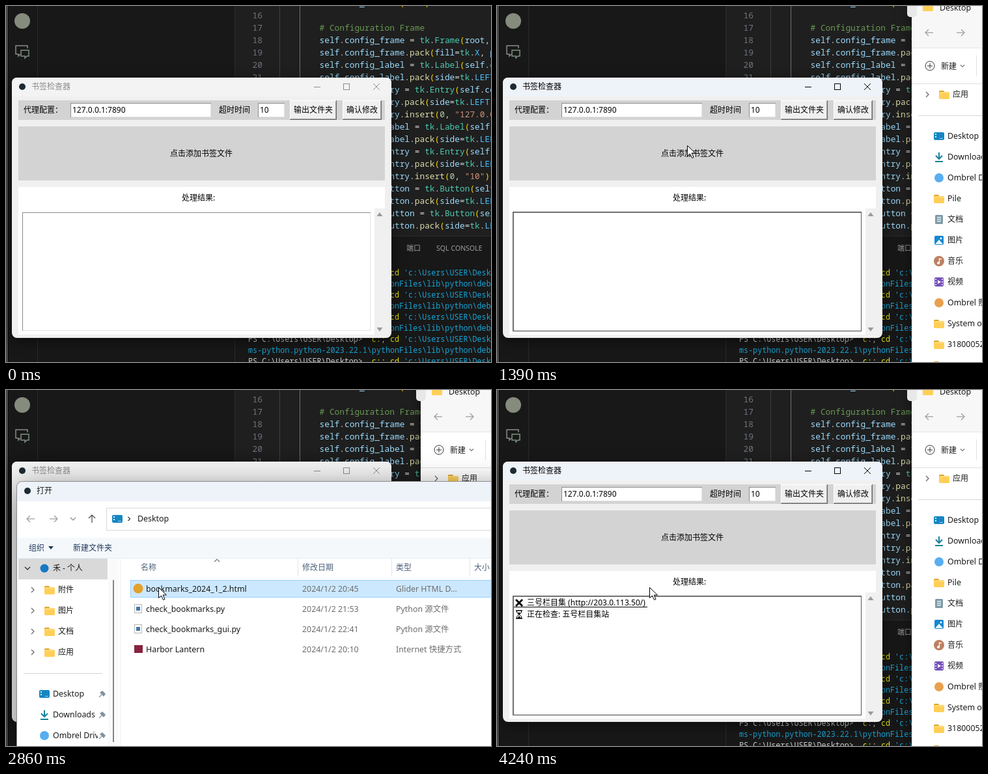
Recreate the animation shown at these times as an HTML page with a canvas. Size 745 px wide and 547 px high, loop 6100 ms.

```html
<!DOCTYPE html>
<html lang="zh">
<head>
<meta charset="utf-8">
<title>书签检查器</title>
<style>
html, body { margin: 0; width: 100%; height: 100%; overflow: hidden; background: #181818; }
canvas { display: block; width: 745px; height: 547px; }
</style>
</head>
<body>
<canvas id="stage" width="745" height="547"></canvas>
<script>
const W = 745, H = 547, LOOP = 6100;
const ctx = document.getElementById('stage').getContext('2d');
const SANS = '"Noto Sans", "Noto Sans CJK SC", sans-serif';
const MONO = '"Noto Sans Mono", "Noto Sans CJK SC", monospace';

// Pointer positions, each held until the next: [time, x, y]
const POINTER = [
  [70, 312, 428], [135, 305, 396], [200, 296, 352], [265, 286, 308], [330, 277, 274],
  [400, 270, 250], [460, 267, 238], [530, 266, 233], [1330, 278, 226], [1390, 292, 214],
  [2260, 285, 226], [2320, 265, 262], [2380, 252, 284], [2450, 240, 298],
  [2510, 236, 302], [2580, 234, 303]
];
const CLICKS = [[950, 1190], [2790, 2860], [2920, 3060]];
const within = (t, a, b) => t >= a && t < b;

function rect(x, y, w, h, color) {
  ctx.fillStyle = color;
  ctx.fillRect(x, y, w, h);
}

function frame(x, y, w, h, color) {
  ctx.strokeStyle = color;
  ctx.lineWidth = 1;
  ctx.strokeRect(x + .5, y + .5, w - 1, h - 1);
}

function rounded(x, y, w, h, r, color) {
  ctx.fillStyle = color;
  ctx.beginPath();
  ctx.roundRect(x, y, w, h, r);
  ctx.fill();
}

function circle(x, y, r, color) {
  ctx.fillStyle = color;
  ctx.beginPath();
  ctx.arc(x, y, r, 0, 7);
  ctx.fill();
}

function path(points, color, fill = false, width = 1) {
  ctx.beginPath();
  for (let i = 0; i < points.length; i += 2) ctx.lineTo(points[i], points[i + 1]);
  if (fill) {
    ctx.fillStyle = color;
    ctx.fill();
  } else {
    ctx.strokeStyle = color;
    ctx.lineWidth = width;
    ctx.stroke();
  }
}

// Text placed by its left edge and vertical centre, on a whole-pixel baseline
function text(str, x, cy, color = '#000', size = 12, family = SANS) {
  ctx.font = `${family === MONO ? 500 : 400} ${size}px ${family}`;
  ctx.fillStyle = color;
  ctx.fillText(str, x, Math.round(cy + size * .35));
  return ctx.measureText(str).width;
}

const label = (str, x, cy, color = '#1a1a1a') =>
  text(str, x, cy, color, /[a-z0-9]{2}/i.test(str) ? 12.4 : 12);

function shadowed(blur, alpha, dy, draw) {
  ctx.save();
  ctx.shadowColor = `rgba(0,0,0,${alpha})`;
  ctx.shadowBlur = blur;
  ctx.shadowOffsetY = dy;
  draw();
  ctx.restore();
}

function clipped(x, y, w, h, draw) {
  ctx.save();
  ctx.beginPath();
  ctx.rect(x, y, w, h);
  ctx.clip();
  draw();
  ctx.restore();
}

function chevron(x, y, dir, color = '#555', s = 3) {
  const shapes = {
    right: [x - s / 2, y - s, x + s / 2, y, x - s / 2, y + s],
    down: [x - s, y - s / 2, x, y + s / 2, x + s, y - s / 2],
    up: [x - s, y + s / 2, x, y - s / 2, x + s, y + s / 2]
  };
  path(shapes[dir], color, false, 1.2);
}

function arrow(x, y, dx, dy, color) {
  path([x - dx * 6, y - dy * 6, x + dx * 6, y + dy * 6], color, false, 1.2);
  const px = x + dx * 6, py = y + dy * 6;
  path([px - dx * 5 - dy * 5, py - dy * 5 - dx * 5, px, py,
        px - dx * 5 + dy * 5, py - dy * 5 + dx * 5], color, false, 1.2);
}

// Icons are centred on (x, y)
const icons = {
  folder(x, y) {
    rounded(x - 8, y - 6, 8, 6, 1.5, '#e0a92e');
    rounded(x - 8, y - 4, 16, 11, 1.5, '#ffcf57');
    rect(x - 7, y - 3, 14, 1, '#ffe29a');
  },
  desktop(x, y) {
    rounded(x - 8, y - 6, 16, 12, 2, '#1686c2');
    rect(x - 6, y - 4, 2, 2, '#d8f1ff');
    rect(x - 6, y, 2, 2, '#d8f1ff');
    rect(x + 1, y + 3, 5, 1, '#8dd2f5');
  },
  download(x, y) {
    path([x, y - 7, x, y + 3], '#12809a', false, 2);
    path([x - 5, y - 2, x, y + 3, x + 5, y - 2], '#12809a', false, 2);
    path([x - 6, y + 7, x + 6, y + 7], '#12809a', false, 2);
  },
  drive: (x, y) => circle(x, y, 7, '#57aef2'),
  cloud: (x, y) => circle(x, y, 6.5, '#1679c5'),
  photos: (x, y) => circle(x, y, 7, '#e8a04c'),
  browser: (x, y) => circle(x, y, 7.5, '#e3a02c'),
  game: (x, y) => rect(x - 6, y - 6, 13, 12, '#86233e'),
  script(x, y) {
    rect(x - 6, y - 7, 12, 14, '#fff');
    frame(x - 6, y - 7, 12, 14, '#b5b5b5');
    rect(x - 3, y - 3, 6, 6, '#4678a5');
  },
  document(x, y) {
    rounded(x - 6, y - 7, 12, 14, 1.5, '#7f9ba8');
    for (const dy of [-4, -1, 2]) rect(x - 3, y + dy, 6, 1.5, '#e8f2f6');
  },
  picture(x, y) {
    rounded(x - 7, y - 7, 14, 14, 2, '#1787cf');
    path([x - 6, y + 6, x, y - 1, x + 6, y + 6], '#e9f7ff', true);
    circle(x + 3, y - 3, 1.5, '#fff');
  },
  music(x, y) {
    circle(x, y, 8, '#bd8062');
    circle(x - 1, y + 3, 2, '#fff');
    path([x + .5, y + 3, x + .5, y - 4, x + 4, y - 3], '#fff', false, 1.3);
  },
  video(x, y) {
    rounded(x - 7, y - 7, 14, 14, 2, '#7651b8');
    for (const dy of [-5, -1, 3]) {
      rect(x - 6, y + dy, 2, 2, '#d8c8f2');
      rect(x + 4, y + dy, 2, 2, '#d8c8f2');
    }
    path([x - 2, y - 3, x + 3, y, x - 2, y + 3], '#fff', true);
  }
};

const FIRST_LINE = 15;
const CODE = [
  'self.use_default(root)',
  '',
  '# Configuration Frame',
  'self.config_frame = tk.Frame(root, bg="lightgray")',
  'self.config_frame.pack(fill=tk.X, padx=10)',
  'self.config_label = tk.Label(self.config_frame)',
  'self.config_label.pack(side=tk.LEFT, padx=5)',
  'self.proxy_entry = tk.Entry(self.config_frame)',
  'self.proxy_entry.pack(side=tk.LEFT, padx=5)',
  'self.proxy_entry.insert(0, "127.0.0.1:7890")',
  'self.timeout_label = tk.Label(self.config_frame)',
  'self.timeout_label.pack(side=tk.LEFT, padx=5)',
  'self.timeout_entry = tk.Entry(self.config_frame)',
  'self.timeout_entry.pack(side=tk.LEFT, padx=5)',
  'self.timeout_entry.insert(0, "10")',
  'self.output_button = tk.Button(self.config_frame)',
  'self.output_button.pack(side=tk.LEFT, padx=5)',
  'self.confirm_button = tk.Button(self.config_frame)',
  'self.confirm_button.pack(side=tk.LEFT, padx=5)'
];
const TOKENS = /#.*|"[^"]*"|\w+(?=\()|\w+|\s+|./g;

function tokenColor(token) {
  if (token[0] === '#') return '#6a9955';
  if (token[0] === '"') return '#ce9178';
  if (/^\d/.test(token)) return '#b5cea8';
  if (/^(tk|Frame|Label|Entry|Button)$/.test(token)) return '#4ec9b0';
  if (/^(pack|insert)$/.test(token)) return '#dcdcaa';
  if (/^[A-Z]+$/.test(token)) return '#4fc1ff';
  if (/^\w/.test(token)) return '#9cdcfe';
  return /[()]/.test(token) ? '#ffd700' : '#d4d4d4';
}

function drawTerminal() {
  rect(352, 353, W, H, '#181818');
  rect(352, 353, W, 1, '#2b2b2b');
  text('端口', 615, 372, '#9d9d9d', 11);
  text('SQL CONSOLE', 661, 372, '#9d9d9d', 10.6);
  const size = 11.72, cyan = '#18a5d6';
  for (let i = 0; i < 9; i++) {
    const y = 410 + 17 * i;
    if (i % 2) {
      text('ms-python.python-2023.22.1\\pythonFiles\\lib\\python\\debugpy', 372, y, cyan, size, MONO);
      continue;
    }
    let x = 372;
    for (const [part, color] of [
      ['PS C:\\Users\\USER\\Desktop>  ', '#cccccc'], ['c:', '#e5e510'], ['; ', '#cccccc'],
      ['cd ', '#e5e510'], ["'c:\\Users\\USER\\Desktop'", cyan]
    ]) x += text(part, x, y, color, size, MONO);
  }
}

function drawEditor() {
  rect(0, 0, W, H, '#181818');
  rect(352, 0, W, 353, '#1f1f1f');
  rect(1, 0, 1, H, '#8a8a8a');
  rect(48, 0, 1, H, '#2b2b2b');
  rect(351, 0, 1, H, '#2b2b2b');
  circle(25, 23, 12, '#858c7d');
  path([22, 74, 19, 77, 19, 74, 15, 74, 15, 61, 33, 61, 33, 65], '#8a8a8a', false, 1.5);
  path([23, 68, 35, 68, 35, 77, 32, 77, 29, 80, 29, 77, 23, 77, 23, 67.5], '#7d9180', false, 1.5);
  rect(420, 0, 1, 353, '#404040');
  rect(451, 0, 1, 353, '#707070');
  CODE.forEach((line, i) => {
    const y = 19 * i - 4;
    text(FIRST_LINE + i, 378.5, y, '#6e7681', 12.83, MONO);
    let x = 481.5;
    for (const token of line.match(TOKENS) || [])
      x += text(token, x, y, tokenColor(token), 12.83, MONO);
  });
  drawTerminal();
}

function drawExplorer() {
  shadowed(20, .5, 4, () => rect(637, -20, 140, 620, '#fff'));
  rect(637, 0, 108, 65, '#f7f7f7');
  rounded(630, -10, 15, 27, 5, '#e8e8e8');
  icons.folder(662, 1);
  label('Desktop', 680, 3);
  arrow(664, 41, -1, 0, '#999');
  arrow(712, 41, 1, 0, '#999');
  rect(637, 64, 108, 1, '#e5e5e5');
  ctx.strokeStyle = '#333';
  ctx.lineWidth = 1;
  ctx.beginPath();
  ctx.arc(665, 92, 7, 0, 7);
  ctx.stroke();
  path([661, 92, 669, 92], '#333');
  path([665, 88, 665, 96], '#333');
  label('新建', 682, 93);
  chevron(715, 92, 'down', '#777');
  rect(736, 76, 1, 32, '#e0e0e0');
  rect(637, 119, 108, 1, '#e0e0e0');
  chevron(661, 136, 'right', '#666', 4);
  icons.folder(687, 136);
  label('应用', 700, 136);
  rect(647, 168, 98, 1, '#d9d9d9');
  [['desktop', 'Desktop'], ['download', 'Downloads'], ['drive', 'Ombrel Drive'], ['folder', 'Pile'],
   ['document', '文档'], ['picture', '图片'], ['music', '音乐'], ['video', '视频'],
   ['photos', 'Ombrel 照片'], ['folder', 'System of'], ['folder', '318000521'], ['folder', 'Notes']
  ].forEach(([icon, name], i) => {
    icons[icon](679, 200 + 32 * i);
    label(name, 692, 200 + 32 * i);
  });
}

function sunken(x, y, w, h) {
  rect(x, y, w, h, '#fff');
  frame(x, y, w, h, '#e3e3e3');
  rect(x, y, w, 1, '#8c8c8c');
  rect(x, y, 1, h, '#8c8c8c');
}

function button(str, x, w, textX) {
  rect(x, 145, w, 30, '#f0f0f0');
  rect(x, 145, w, 1, '#fff');
  rect(x, 145, 1, 30, '#fff');
  rect(x + 1, 173, w - 2, 1, '#a0a0a0');
  rect(x + w - 2, 146, 1, 28, '#a0a0a0');
  rect(x, 174, w, 1, '#696969');
  rect(x + w - 1, 145, 1, 30, '#696969');
  text(str, textX, 160);
}

function hourglass(x, y) {
  path([x - 5, y - 6, x + 5, y - 6], '#000', false, 1.5);
  path([x - 5, y + 6, x + 5, y + 6], '#000', false, 1.5);
  path([x - 3.5, y - 6, x - 3.5, y - 3, x + 3.5, y + 3, x + 3.5, y + 6], '#000');
  path([x + 3.5, y - 6, x + 3.5, y - 3, x - 3.5, y + 3, x - 3.5, y + 6], '#000');
  path([x - 2.5, y - 3, x + 2.5, y - 3, x, y], '#000', true);
  path([x - 3, y + 6, x, y + 2, x + 3, y + 6], '#000', true);
}

function drawResults(t) {
  if (t < 3710) return;
  if (t < 4240) {
    hourglass(34, 327);
    text('正在检查: 三号栏目集', 46, 327);
    return;
  }
  path([29, 322, 39, 332], '#000', false, 2.8);
  path([39, 322, 29, 332], '#000', false, 2.8);
  text('三号栏目集 (http://203.0.113.50/)', 46, 327);
  rect(26, 333, 205, 1, '#000');
  hourglass(34, 345);
  text('正在检查: 五号栏目集站', 46, 345);
}

function drawApp(t) {
  const active = within(t, 200, 1520) || t >= 3120;
  const focused = within(t, 880, 1520) || t >= 3120;
  const ink = active ? '#000' : '#8b8b8b';
  shadowed(22, .5, 5, () => rounded(9, 110, 583, 400, 8, '#f0f0f0'));
  rounded(9, 110, 583, 30, [8, 8, 0, 0], active ? '#eef2f9' : '#f3f3f3');
  rect(9, 139, 583, 1, '#f0f0f0');
  circle(25, 124, 5, '#1c2a33');
  text('书签检查器', 39, 124, ink);
  rect(473, 124, 10, 1, ink);
  frame(518, 119, 10, 10, ink);
  path([564, 119, 574, 129], ink);
  path([574, 119, 564, 129], ink);

  rect(19, 145, 563, 30, '#d3d3d3');
  text('代理配置：', 27, 160);
  sunken(99, 149, 216, 22);
  text('127.0.0.1:7890', 102, 160);
  text('超时时间', 327, 160);
  sunken(387, 149, 41, 22);
  text('10', 390, 160);
  button('输出文件夹', 436, 72, 442);
  button('确认修改', 517, 60, 523);

  rect(19, 185, 563, 83, '#d3d3d3');
  text('点击添加书签文件', 252, 227);
  rect(19, 278, 563, 227, '#fff');
  text('处理结果:', 270, 295);
  rect(566, 311, 16, 194, '#f0f0f0');
  path([569.5, 323, 574, 317, 578.5, 323], '#9a9a9a', true);
  path([569.5, 494, 574, 500, 578.5, 494], '#9a9a9a', true);
  sunken(25, 317, 535, 182);
  if (focused) frame(24, 316, 536, 184, '#555');
  drawResults(t);
}

const FILES = [
  ['browser', 'bookmarks_2024_1_2.html', '20:45', 'Glider HTML D...'],
  ['script', 'check_bookmarks.py', '21:53', 'Python 源文件'],
  ['script', 'check_bookmarks_gui.py', '22:41', 'Python 源文件'],
  ['game', 'Harbor Lantern', '20:10', 'Internet 快捷方式']
];

function drawNavigation() {
  arrow(38, 198, -1, 0, '#999');
  arrow(73, 198, 1, 0, '#999');
  chevron(103, 198, 'down', '#888', 4);
  arrow(132, 198, 0, -1, '#444');
  frame(154, 181, 620, 35, '#d9d9d9');
  icons.desktop(171, 198);
  chevron(189, 198, 'right', '#333');
  label('Desktop', 202, 198);
  rect(18, 227, W, 31, '#f5f8fb');
  rect(18, 258, W, 1, '#e9eef3');
  label('组织', 35, 243, '#1e395b');
  path([65, 240, 73, 240, 69, 245], '#1e395b', true);
  label('新建文件夹', 103, 243, '#1e395b');
}

function drawSidebar() {
  rect(19, 259, 137, 32, '#d9d9d9');
  chevron(33, 274, 'down', '#222', 4);
  icons.cloud(59, 274);
  label('禾 - 个人', 72, 274);
  ['附件', '图片', '文档', '应用'].forEach((name, i) => {
    chevron(41, 307 + 32 * i, 'right', '#666', 4);
    icons.folder(67, 307 + 32 * i);
    label(name, 80, 307 + 32 * i);
  });
  rect(27, 435, 121, 1, '#d4d4d4');
  [['desktop', 'Desktop'], ['download', 'Downloads'], ['drive', 'Ombrel Drive']].forEach(([icon, name], i) => {
    const y = 467 + 32 * i;
    icons[icon](59, y);
    clipped(72, y - 12, 69, 24, () => label(name, 72, y));
    path([143, y + 5, 147, y + 1], '#8291a0', false, 1.2);
    path([144, y - 2, 148, y - 5, 153, y, 150, y + 4], '#8291a0', true);
  });
}

function drawFileList(t) {
  if (within(t, 2320, 2450)) {
    rect(177, 259, 272, 27, '#d9ebf9');
    rect(433, 259, 1, 27, '#b5d3ea');
    chevron(440, 272, 'down', '#456');
  }
  chevron(324, 262, 'up', '#777', 4);
  for (const x of [448, 592, 712]) rect(x, 259, 1, 27, '#e5e5e5');
  [['名称', 207], ['修改日期', 455], ['类型', 599], ['大小', 719]]
    .forEach(([name, x]) => label(name, x, 273, '#4c607a'));
  if (t >= 2790) {
    rect(191, 292, W, 27, '#cce8ff');
    frame(191, 292, W, 27, '#99d1ff');
  } else if (t >= 2450) {
    rect(191, 292, W, 27, '#e5f3ff');
  }
  FILES.forEach(([icon, name, time, type], i) => {
    const y = 306 + 31 * i;
    icons[icon](203, y - 1);
    label(name, 215, y);
    label('2024/1/2 ' + time, 455, y, '#6d6d6d');
    label(type, 599, y, '#6d6d6d');
  });
}

function drawDialog(t) {
  shadowed(46, .5, 10, () => rounded(17, 141, 800, 500, 8, '#fff'));
  rounded(17, 141, 800, 30, [8, 0, 0, 0], '#eef3f9');
  ctx.strokeStyle = '#8d8d8d';
  ctx.lineWidth = 1;
  ctx.beginPath();
  ctx.roundRect(16.5, 140.5, 800, 500, 8);
  ctx.stroke();
  circle(33, 155, 5, '#1c2a33');
  label('打开', 47, 155);
  if (t < 1660) {
    rect(157, 258, 16, 289, '#f0f0f0');
    rect(164, 275, 2, 272, '#858585');
    return;
  }
  drawNavigation();
  rect(157, 259, 16, 288, '#fafafa');
  rect(164, 292, 2, 249, '#858585');
  rect(175, 259, 1, 288, '#f0f0f0');
  if (t >= 1720) drawSidebar();
  if (t >= 1790) drawFileList(t);
}

function drawPointer(t) {
  const spot = POINTER.findLast(([time]) => time <= t);
  if (!spot) return;
  const [, x, y] = spot;
  if (CLICKS.some(([a, b]) => within(t, a, b))) circle(x, y, 12, 'rgba(255,242,0,.6)');
  const outline = [0, 0, 0, 16, 4, 12.5, 7, 19, 9.5, 18, 6.7, 11.5, 12, 11.5, 0, 0]
    .map((v, i) => v + (i % 2 ? y : x) + .5);
  path(outline, '#fff', true);
  path(outline, '#000');
}

function render(now) {
  const t = now % LOOP;
  drawEditor();
  if (t >= 1390) drawExplorer();
  drawApp(t);
  if (within(t, 1520, 2920)) drawDialog(t);
  drawPointer(t);
}

const start = performance.now();
function tick() {
  render(performance.now() - start);
  requestAnimationFrame(tick);
}
tick();
</script>
</body>
</html>
```
